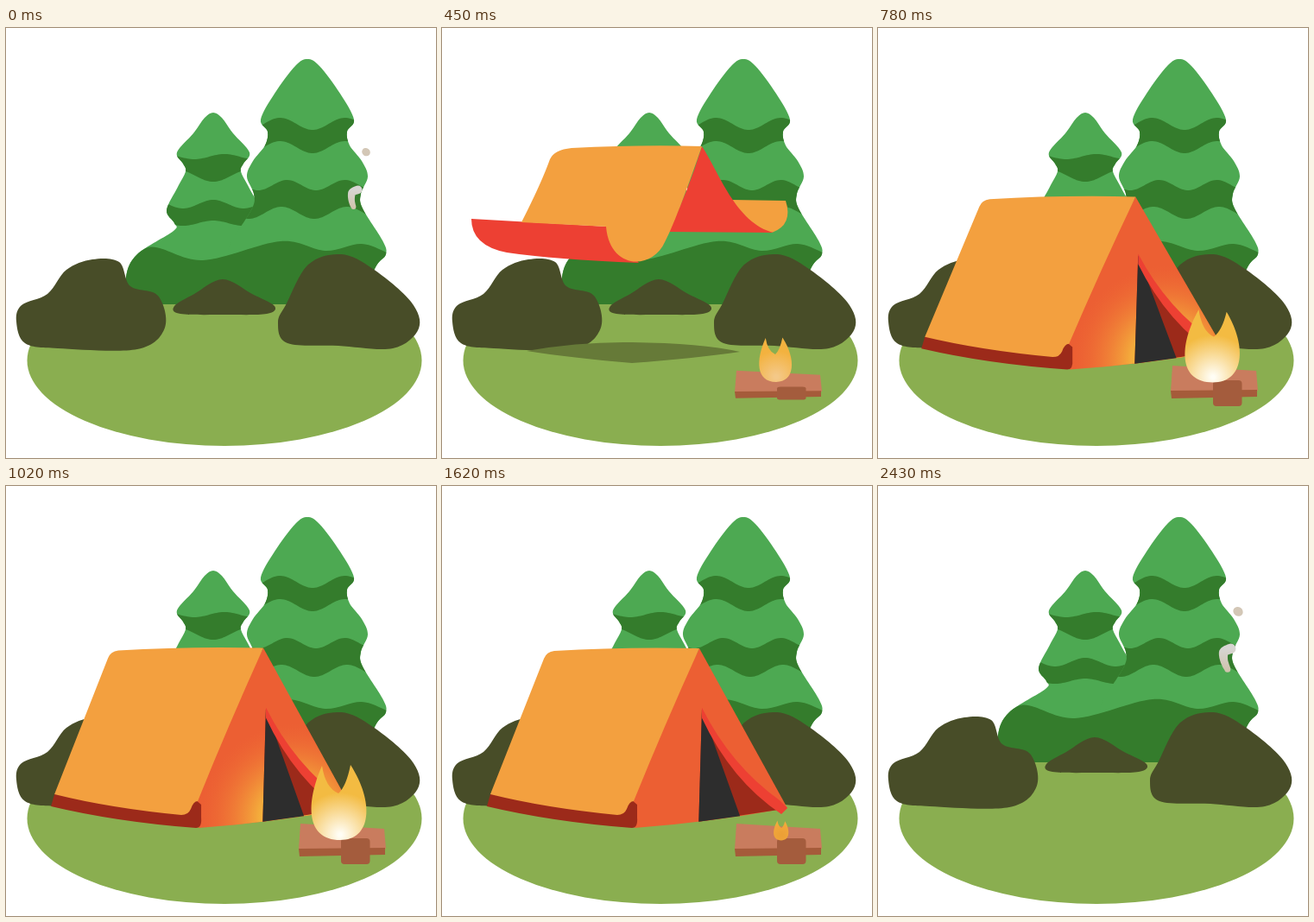
An HTML page with a canvas that plays this animation: 498x498 px, repeating every 2460 ms.

```html
<!DOCTYPE html>
<html lang="en">
<head>
<meta charset="utf-8">
<title>Campsite</title>
<style>
html, body { margin: 0; width: 100%; height: 100%; overflow: hidden; background: #fff; }
canvas { display: block; }
</style>
</head>
<body>
<canvas id="stage" width="498" height="498"></canvas>
<script>
const ctx = document.getElementById('stage').getContext('2d');
const LOOP = 2460, STEP = 30;
const GREEN = '#4da952', PINE = '#347c2c', BUSH = '#484d28', ORANGE = '#f3a03f',
  FRONT = '#ec5f33', RED = '#ed4033', MAROON = '#9c2a1a';

const mix = (a, b, u) => a + (b - a) * u;

// Smooth rise from 0 to 1 between two times.
function ease(from, to, t) {
  const u = Math.min(1, Math.max(0, (t - from) / (to - from)));
  return u * u * (3 - 2 * u);
}

function fill(shape, color) {
  ctx.fillStyle = color;
  ctx.fill(typeof shape === 'string' ? new Path2D(shape) : shape);
}

function clipped(shape, draw) {
  ctx.save();
  ctx.clip(shape);
  draw();
  ctx.restore();
}

// Smooth curve through flat x,y points.
function curve(pts, closed) {
  const n = pts.length / 2, path = new Path2D();
  const p = i => {
    const k = closed ? (i + n) % n : Math.min(n - 1, Math.max(0, i));
    return [pts[2 * k], pts[2 * k + 1]];
  };
  path.moveTo(...p(0));
  for (let i = 0; i < (closed ? n : n - 1); i++) {
    const [a, b, c, d] = [p(i - 1), p(i), p(i + 1), p(i + 2)];
    path.bezierCurveTo(b[0] + (c[0] - a[0]) / 6, b[1] + (c[1] - a[1]) / 6,
      c[0] - (d[0] - b[0]) / 6, c[1] - (d[1] - b[1]) / 6, ...c);
  }
  return path;
}

// Mirror a half profile of [half width, y] pairs around a trunk.
function tree(x, profile) {
  const left = profile.flatMap(([w, y]) => [x - w, y]);
  const right = profile.slice(0, -1).reverse().flatMap(([w, y]) => [x + w, y]);
  return curve([...left, ...right]);
}

const wave = (level, amp, trough, period) => x => level + amp * Math.cos((x - trough) * 2 * Math.PI / period);

function band(from, to, top, bottom) {
  const path = new Path2D();
  for (let x = from; x <= to; x += 2) path.lineTo(x, top(x));
  for (let x = to; x >= from; x -= 2) path.lineTo(x, bottom(x));
  return path;
}

const smallTree = tree(240, [[99, 320], [101, 288], [88, 262], [46, 235], [45, 226], [54, 211], [41, 184],
  [32, 166], [35, 157], [42, 144], [23, 122], [10, 104], [0, 98]]);
const bigTree = tree(349, [[60, 320], [79, 277], [91, 262], [87, 246], [64, 209], [62, 192], [70, 172],
  [63, 154], [49, 136], [46, 120], [54, 106], [38, 76], [14, 44], [0, 36]]);
const woods = new Path2D();
woods.addPath(smallTree);
woods.addPath(bigTree);

const smallBands = [
  band(180, 300, wave(149, 3, 218, 70), wave(171, 7, 240, 84)),
  band(180, 310, wave(204, 5, 205, 70), wave(226, 3, 205, 70))
];
const bigBands = [
  band(280, 420, wave(111, 7, 355, 75), wave(138, 7, 355, 75)),
  band(270, 430, wave(182, 6, 359, 67), wave(214, 7, 357, 76))
];
const undergrowth = curve([130, 290, 165, 254, 228, 269, 318, 247, 370, 258, 412, 250, 445, 262]);
undergrowth.lineTo(445, 320);
undergrowth.lineTo(130, 320);

const bushes = [
  [12, 340, 18, 321, 48, 308, 70, 280, 100, 268, 131, 271, 144, 299, 176, 310, 184, 347, 152, 372, 60, 371, 22, 365],
  [195, 322, 218, 308, 251, 291, 285, 308, 311, 322, 302, 331, 255, 332, 202, 331],
  [315, 341, 325, 319, 350, 274, 388, 262, 425, 279, 469, 317, 478, 348, 448, 371, 385, 368, 326, 365]
].map(points => curve(points, true));

function drawTree(shape, bands) {
  fill(shape, GREEN);
  clipped(shape, () => bands.forEach(b => fill(b, PINE)));
}

function drawScenery() {
  ctx.fillStyle = '#fff';
  ctx.fillRect(0, 0, 498, 498);
  const ground = new Path2D();
  ground.ellipse(253, 385, 228.5, 99, 0, 0, 7);
  fill(ground, '#8aae50');
  drawTree(smallTree, smallBands);
  drawTree(bigTree, bigBands);
  clipped(woods, () => fill(undergrowth, PINE));
  bushes.forEach(b => fill(b, BUSH));
}

function scaledAt(x, y, sx, sy, draw) {
  ctx.save();
  ctx.translate(x, y);
  ctx.scale(sx, sy);
  ctx.translate(-x, -y);
  draw();
  ctx.restore();
}

// The cloth pops up in the air, then falls.
function drawCloth(t) {
  if (t < 230 || t >= 560) return;
  const size = ease(230, 390, t);
  const drop = .0065 * ((Math.max(t, 400) - 400) ** 2 - 2500);
  scaledAt(221, 375, size, size, () =>
    fill('M98 374Q160 363 220 364Q300 365 345 375Q290 383 220 388Q150 382 98 374Z', '#667a38'));
  ctx.save();
  ctx.translate(0, drop);
  scaledAt(221, 205, size, size, () => {
    fill('M335 199L398 200Q407 228 382 237Q345 236 335 199Z', ORANGE);
    fill('M301 137C320 165 340 226 384 237L262 236Q285 190 301 137Z', RED);
    fill('M34 221L192 230L228 272Q130 268 75 260Q34 252 34 221Z', RED);
    fill('M92 225Q115 180 125 152Q130 141 150 139Q230 135 301 137C286 180 270 225 258 248C243 281 194 280 190 230Z', ORANGE);
  });
  ctx.restore();
}

function drawDoor(rx, ry, by, cx, cy, open, base) {
  const x = rx + 3, y = mix(ry, by, .34);
  const [ex, ey] = base(mix(.74, .95, open));
  const flap = `rgb(${mix(236, 156, open)},${mix(95, 42, open)},${mix(51, 26, open)})`;
  fill(`M${x} ${y}Q${mix(x, ex, .35)} ${mix(y, ey, .55)} ${ex} ${ey}L${base(.42)}Z`, flap);
  fill(`M${x} ${y}L${base(.42)}L${base(mix(.42, .69, open))}Z`, '#2d2d2d');
  ctx.globalAlpha = open;
  fill(`M${x} ${y - 2}Q${mix(x, cx, .34)} ${mix(y, cy, .57)} ${cx - 9} ${cy - 9}L${cx} ${cy}L${cx - 7} ${cy + 7}
    Q${mix(x, cx, .34)} ${mix(y, cy, .72)} ${x} ${y + 10}Z`, RED);
  ctx.globalAlpha = 1;
}

function drawTent(t, heat) {
  if (t < 560 || t >= 2250) return;
  // A damped spring lifts the tent; later it sinks and draws in.
  const age = t - 570, sink = Math.max(0, (t - 1700) / 550);
  const squash = .48 * Math.exp(-age / 140) * Math.cos(age / 130 * Math.PI) + .95 * sink ** 1.8;
  const narrow = Math.sin(Math.PI * Math.min(.5, sink));
  const open = ease(570, 780, t) * (1 - ease(1640, 1950, t));
  const k = 1 - squash;

  // a, b, c: left, front and right foot; l, r: ridge ends
  const ax = 52 - 46 * squash + 35 * narrow, ay = 371 + 8 * squash;
  const bx = 223 - 21 * squash + 6 * narrow, by = 396 - 12 * squash;
  const cx = 400 + 28 * squash - 27 * narrow, cy = 373 + 8 * squash;
  const lx = 122 - 18 * squash + 22 * narrow, rx = 298 + 7 * squash - 13 * narrow;
  const ry = by - 208 * k, ly = ry + 3 * k;
  const base = u => [mix(bx, cx, u), mix(by, cy, u) + 10 * u * (1 - u)];

  const front = new Path2D(`M${rx} ${ry}L${cx} ${cy}Q${mix(bx, cx, .5)} ${mix(by, cy, .5) + 5} ${bx} ${by}
    L${bx - 5} ${by - 20 * k}L${mix(rx, bx, .5) - 15} ${mix(ry, by, .5)}Z`);
  fill(front, FRONT);
  const glow = ctx.createRadialGradient(335, 385, 40, 335, 385, 110);
  glow.addColorStop(0, `rgba(244,176,60,${heat})`);
  glow.addColorStop(1, 'rgba(240,110,52,0)');
  fill(front, glow);
  if (open > 0) drawDoor(rx, ry, by, cx, cy, open, base);

  const hem = `${ax + 4} ${ay - 14 * k}`;
  fill(`M${hem}L${ax} ${ay}Q${mix(ax, bx, .45)} ${mix(ay, by, .45) + 7} ${bx - 3} ${by}
    Q${bx + 4} ${by} ${bx + 3} ${by - 12 * k}L${bx + 3} ${by - 27 * k}L${bx - 4} ${by - 33 * k}Z`, MAROON);
  fill(`M${hem}L${lx - 4} ${ly + 9 * k}Q${lx - 1} ${ly + 1} ${lx + 8} ${ly}
    Q${mix(lx, rx, .5)} ${ry - 2} ${rx} ${ry}Q${mix(rx, bx, .54)} ${mix(ry, by, .43)} ${bx - 1} ${by - 31 * k}
    Q${bx - 6} ${by - 31 * k} ${bx - 9} ${by - 22 * k}Q${bx - 12} ${by - 15 * k} ${bx - 20} ${by - 15 * k}
    Q${mix(ax, bx, .4)} ${mix(ay, by, .4) - 8 * k} ${hem}Z`, ORANGE);
}

function drawLogs(t) {
  const plank = ease(300, 500, t) * (1 - ease(1880, 2130, t));
  const log = ease(380, 520, t) * (1 - ease(1700, 1960, t));
  scaledAt(389, 427, 1, plank, () => {
    fill('M341 391L438 397L440 420L339 421Z', '#c97c5e');
    fill('M339 420L439 419L439 427L340 429Z', '#a55b3a');
  });
  scaledAt(405, 423, 1, log, () => {
    const end = new Path2D();
    end.roundRect(388, 408, 33.5, 30, 4);
    fill(end, '#a45c3d');
  });
}

// Two tongues sway together while the whole flame grows and dies down.
function drawFlame(t, size) {
  if (size < .02) return;
  const sway = Math.cos((t - 600) / 140 * Math.PI);
  const cx = 389.5 + 2.5 * sway + 5 * ease(1380, 1620, t), bottom = 411 + sway;
  const point = (dx, height) => [cx + dx * size, bottom - height * size];
  const [lx, ly] = point(12 * sway - 9, 82 - 4 * sway);
  const [nx, ny] = point(6 + 8 * sway, 51 - 3 * sway);
  const [rx, ry] = point(22 + 10 * sway, 73 - 14 * sway);
  const w = 40 * size;
  const paint = ctx.createRadialGradient(cx, bottom - 6, 2, cx, bottom - 6, 46 * size + 3);
  const white = Math.max(0, 1.4 * size - .4);
  paint.addColorStop(0, `rgb(${mix(236, 255, white)},${mix(160, 253, white)},${mix(54, 244, white)})`);
  paint.addColorStop(1, `rgb(243,${mix(164, 187, size)},${mix(58, 66, size)})`);
  fill(`M${cx} ${bottom}C${cx + w * .9} ${bottom} ${cx + w} ${mix(ry, bottom, .5)} ${rx} ${ry}
    Q${mix(nx, rx, .65)} ${mix(ry, ny, .75)} ${nx} ${ny}Q${mix(lx, nx, .2)} ${mix(ly, ny, .8)} ${lx} ${ly}
    C${cx - w} ${mix(ly, bottom, .5)} ${cx - w} ${bottom} ${cx} ${bottom}Z`, paint);
}

function drawSmoke(t) {
  const time = t < 300 ? t + LOOP : t;
  if (time < 1650 || time >= 2700) return;
  const top = 396 - 216 * (1 - Math.exp((1650 - time) / 240));
  const bottom = Math.max(top, 400 - 200 * ease(1750, 2550, time));
  const radius = 12 * ease(1650, 1900, time) * (1 - ease(2150, 2700, time));
  const taper = mix(.93, .4, ease(1980, 2430, time));
  const paint = ctx.createLinearGradient(0, top, 0, bottom + 1);
  paint.addColorStop(0, '#d7d5d2');
  paint.addColorStop(1, '#d0c3ae');
  const trail = new Path2D();
  for (let i = 0; i <= 90; i++) {
    const u = i / 90, y = mix(top, bottom, u), r = radius * (1 - taper * u);
    const x = 405 + 5 * Math.cos((y - 295) / 10.5) + 1.25 * radius * Math.max(0, 1 - 5 * u) ** 2;
    trail.moveTo(x + r, y);
    trail.arc(x, y, r, 0, 7);
  }
  fill(trail, paint);

  const puff = new Path2D();
  const size = 7 * ease(2100, 2250, time) * (1 - ease(2350, 2660, time));
  puff.ellipse(417, 146 - 22 * ease(2400, 2700, time), size, size * .9, .6, 0, 7);
  fill(puff, '#d3c7b6');
}

function frame() {
  const t = Math.floor(performance.now() % LOOP / STEP) * STEP;
  const fire = ease(360, 520, t) * (1 - .73 * ease(1380, 1620, t)) * (1 - ease(1620, 1690, t));
  drawScenery();
  drawCloth(t);
  drawTent(t, Math.max(0, 1.4 * fire - .4));
  drawLogs(t);
  drawFlame(t, fire);
  drawSmoke(t);
  requestAnimationFrame(frame);
}
frame();
</script>
</body>
</html>
```
